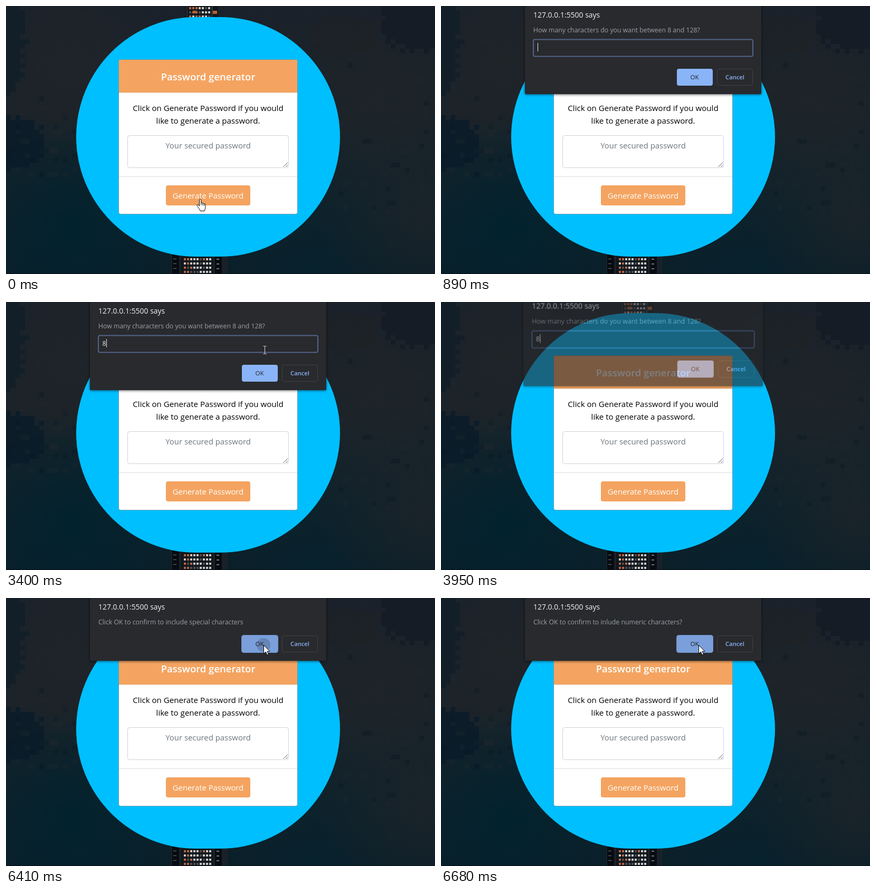
Animation of 813 by 508 pixels, one loop 8000 ms. Source, as an HTML page with a canvas:

```html
<!DOCTYPE html>
<html lang="en">
<head>
<meta charset="utf-8">
<title>Password generator</title>
<style>
html, body { margin: 0; width: 100%; height: 100%; overflow: hidden; background: #1b2228; }
canvas { display: block; width: 813px; height: 508px; }
</style>
</head>
<body>
<canvas id="stage" width="813" height="508"></canvas>
<script>
const W = 813, H = 508, LOOP = 8000;
const FONT = '"Open Sans", "Noto Sans", sans-serif';
const ORANGE = '#f4a460', LINK = '#8ab4f8';
const ctx = document.getElementById('stage').getContext('2d');

function makeLayer() {
  const c = document.createElement('canvas');
  c.width = W;
  c.height = H;
  return c.getContext('2d');
}

function seeded(seed) {
  return () => {
    seed = (seed * 1664525 + 1013904223) >>> 0;
    return seed / 4294967296;
  };
}

function box(g, x, y, w, h, r, fill, stroke, line = 1) {
  g.beginPath();
  g.roundRect(x, y, w, h, r);
  if (fill) { g.fillStyle = fill; g.fill(); }
  if (stroke) { g.strokeStyle = stroke; g.lineWidth = line; g.stroke(); }
}

function label(g, str, x, y, size, color, align = 'left', weight = 400) {
  g.font = `${weight} ${size}px ${FONT}`;
  g.textAlign = align;
  g.fillStyle = color;
  g.fillText(str, x, y);
}

// Night photograph, reduced to soft tones and a few blocky patches
function glow(g, x, y, r, rgb, a) {
  const grad = g.createRadialGradient(x, y, 0, x, y, r);
  grad.addColorStop(0, `rgba(${rgb},${a})`);
  grad.addColorStop(1, `rgba(${rgb},0)`);
  g.fillStyle = grad;
  g.fillRect(0, 0, W, H);
}

function patch(g, cx, cy, rx, ry, color, rnd) {
  g.fillStyle = color;
  for (let y = 0; y < H; y += 9) {
    for (let x = 0; x < W; x += 9) {
      const d = Math.hypot((x + 4 - cx) / rx, (y + 4 - cy) / ry);
      if (d < 0.85 + rnd() * 0.3) g.fillRect(x, y, 9, 9);
    }
  }
}

function windows(g, x0, x1, y0, y1, rnd) {
  for (let y = y0; y < y1; y += 8) {
    for (let x = x0; x < x1; x += 6) {
      const warm = rnd() < (x < x0 + 18 ? 0.6 : 0.2);
      g.fillStyle = warm ? '#b5663f' : rnd() < 0.75 ? '#c9c8c4' : '#4b4e52';
      g.fillRect(x, y, 4, 4);
      g.fillStyle = '#252a30';
      g.fillRect(x, y + 5, 4, 1);
    }
  }
}

function paintScenery(g) {
  const rnd = seeded(41);
  const sky = g.createLinearGradient(0, 0, 0, H);
  sky.addColorStop(0, '#1a212a');
  sky.addColorStop(0.4, '#1b2329');
  sky.addColorStop(0.75, '#10222b');
  sky.addColorStop(1, '#0a1f29');
  g.fillStyle = sky;
  g.fillRect(0, 0, W, H);
  glow(g, 130, 420, 210, '0,34,46', 0.9);
  glow(g, 600, 500, 170, '4,36,48', 0.5);
  glow(g, 790, 400, 200, '28,35,41', 0.8);
  glow(g, 120, 100, 170, '33,37,41', 0.8);
  glow(g, 700, 170, 150, '31,37,42', 0.7);
  patch(g, 0, 60, 36, 105, 'rgba(17,31,40,.8)', rnd);
  patch(g, 14, 258, 60, 48, 'rgba(8,27,40,.7)', rnd);
  patch(g, 785, 25, 75, 62, 'rgba(20,27,37,.8)', rnd);
  patch(g, 645, 55, 70, 36, 'rgba(31,34,38,.6)', rnd);
  for (let i = 0; i < 60; i++) {
    const left = i % 2;
    const x = left ? rnd() * 130 : 630 + rnd() * 175;
    const y = left ? 170 + rnd() * 150 : 110 + rnd() * 310;
    g.fillStyle = rnd() < 0.5 ? 'rgba(8,25,35,.35)' : 'rgba(36,41,45,.3)';
    g.fillRect(Math.round(x / 9) * 9, Math.round(y / 9) * 9, 9 + 9 * (rnd() < 0.3), 9);
  }
  g.fillStyle = '#11171d';
  g.fillRect(340, 0, 62, 24);
  g.fillStyle = '#29323a';
  g.fillRect(342, 0, 2, 24);
  g.fillRect(389, 0, 3, 24);
  windows(g, 347, 387, 2, 22, rnd);
  g.fillStyle = '#b56231';
  g.fillRect(354, 9, 7, 5);
  g.fillRect(392, 9, 8, 6);

  g.fillStyle = '#182129';
  g.fillRect(313, 465, 107, 43);
  g.fillStyle = '#080c11';
  g.fillRect(315, 465, 13, 43);
  g.fillRect(396, 465, 13, 43);
  g.fillStyle = '#10161c';
  g.fillRect(332, 465, 60, 43);
  windows(g, 337, 388, 478, 506, rnd);
  g.fillStyle = '#6f777c';
  for (let y = 479; y < 506; y += 9) {
    g.fillRect(317, y, 6, 1);
    g.fillRect(399, y, 5, 2);
  }
  g.fillStyle = '#080f16';
  g.fillRect(0, 507, W, 1);
}

function paintCard(g) {
  box(g, 133, 21, 500, 454, 227, '#00bfff');
  box(g, 213.5, 101.5, 339, 293, 4, '#fff', 'rgba(0,0,0,.3)');
  box(g, 214, 102, 338, 62, [3, 3, 0, 0], ORANGE);
  g.fillStyle = '#dfdfdf';
  g.fillRect(214, 164, 338, 1);
  g.fillRect(214, 323, 338, 1);
  label(g, 'Password generator', 383, 141, 18.5, '#fff', 'center', 600);
  label(g, 'Click on Generate Password if you would', 383, 199, 15.1, '#000', 'center');
  label(g, 'like to generate a password.', 383, 223, 15.1, '#000', 'center');
  box(g, 230.5, 245.5, 305, 61, 4, '#fff', '#ced4da');
  label(g, 'Your secured password', 383, 270, 14.9, '#6c757d', 'center');
  g.strokeStyle = '#555';
  g.lineWidth = 1;
  g.beginPath();
  g.moveTo(525.5, 305); g.lineTo(534, 296.5);
  g.moveTo(530.5, 305); g.lineTo(534, 301.5);
  g.stroke();
  box(g, 303, 340, 160, 38, 4, ORANGE);
  label(g, 'Generate Password', 383, 365, 14.8, '#fff', 'center');
}

function drawDialog(g, d) {
  const bottom = d.prompt ? 167 : 119;
  const by = bottom - 48;
  g.clearRect(0, 0, W, H);
  g.save();
  g.shadowColor = 'rgba(0,0,0,.6)';
  g.shadowBlur = 5;
  g.shadowOffsetY = 1;
  box(g, 159, -40, 448, bottom + 40, 2, '#292a2d');
  g.restore();
  label(g, '127.0.0.1:5500 says', 175, 22, 13.95, '#f1f3f4');
  label(g, d.text, 175, 50, 12.3, '#9aa0a6');
  if (d.prompt) {
    box(g, 175, 63.5, 416, 32, 3, null, '#52648a', 2);
    if (d.value) label(g, d.value, 182.5, 83, 12.3, '#e8eaed');
    if (d.caret) {
      g.fillStyle = '#e8eaed';
      g.fillRect(d.value ? 190 : 183, 70, 1, 16);
    }
    box(g, 447, by, 68, 32, 4, LINK);
  } else {
    box(g, 446.5, by - 0.5, 69, 33, 4, '#7b9fdb', '#6f91ca');
  }
  if (d.pressed) {
    g.beginPath();
    g.arc(488, 89, 13, 0, Math.PI * 2);
    g.fillStyle = 'rgba(70,85,120,.35)';
    g.fill();
  }
  label(g, 'OK', 480.5, by + 20, 11.5, '#202124', 'center', 500);
  box(g, 523.5, by + 0.5, 67, 31, 4, null, '#3f4246');
  label(g, 'Cancel', 557, by + 20, 11.2, LINK, 'center', 600);
}

function drawArrow(x, y) {
  const p = new Path2D('M0 0V16L3.8 12.5 6.4 18.6 9 17.5 6.4 11.6H11.4Z');
  cursor(p, x, y, '#fff', '#000');
}

function drawHand(x, y) {
  const p = new Path2D('M5 2.5Q6.8 0 8.3 2.5V9Q10 7.5 11.3 9.5 13 8.5 14 10.5 ' +
    '16.5 9.7 16.5 12.5V17Q16 20 14.5 24H6.7Q5.5 20 2.5 17 -1 13 1 12.3 2.7 11.7 5 14.5Z');
  cursor(p, x, y, '#fff', '#000');
  cursor(new Path2D('M8.3 9V13M11.3 10V13.5M14 11V14'), x, y, null, '#000');
}

function drawBeam(x, y) {
  const p = new Path2D('M-3 0H-1.5Q0 0 0 1.5Q0 0 1.5 0H3M0 1V14M-3 15H-1.5Q0 15 0 13.5Q0 15 1.5 15H3');
  cursor(p, x, y, null, '#d8d8d8');
}

function cursor(path, x, y, fill, stroke) {
  ctx.save();
  ctx.translate(x, y);
  if (fill) { ctx.fillStyle = fill; ctx.fill(path); }
  ctx.strokeStyle = stroke;
  ctx.lineWidth = 1;
  ctx.stroke(path);
  ctx.restore();
}

// [start, alpha, scale, y shift]
const POSES = [
  [0, 0, 1, 0],
  [500, 0.3, 1.02, -19],
  [620, 0.7, 1.013, -9.7],
  [770, 0.94, 1.003, -2],
  [890, 1, 1, 0],
  [3950, 0.6, 1.013, -9.7],
  [4100, 1, 1, 0],
  [6530, 0.6, 1, 0],
  [6680, 1, 1, 0]
];

function dialogAt(t) {
  if (t < 4100) {
    return {
      prompt: true,
      text: 'How many characters do you want between 8 and 128?',
      value: t >= 2430 ? '8' : '',
      caret: t < 1040 || (t >= 1560 && t < 2150) || (t >= 2430 && t < 2990) || t >= 3400
    };
  }
  return {
    text: t < 6530 ? 'Click OK to confirm to include special characters'
      : 'Click OK to confirm to inlude numeric characters?',
    pressed: t >= 6410 && t < 6530
  };
}

const page = makeLayer(), sheet = makeLayer();
paintScenery(page);
paintCard(page);

function render(t) {
  ctx.drawImage(page.canvas, 0, 0);
  const [, alpha, scale, dy] = POSES.filter(p => p[0] <= t).pop();
  if (alpha) {
    drawDialog(sheet, dialogAt(t));
    ctx.save();
    ctx.globalAlpha = alpha;
    ctx.setTransform(scale, 0, 0, scale, 383 * (1 - scale), dy);
    ctx.drawImage(sheet.canvas, 0, 0);
    ctx.restore();
  }
  if (t < 890) drawHand(361.5, 364.5);
  else if (t >= 1040 && t < 1170) drawArrow(497.5, 278.5);
  else if (t >= 1310 && t < 3950) drawBeam(490.5, 83.5);
  else if (t >= 4100) drawArrow(488.5, 89.5);
}

const start = performance.now();
function tick() {
  render((performance.now() - start) % LOOP);
  requestAnimationFrame(tick);
}
tick();
</script>
</body>
</html>
```
